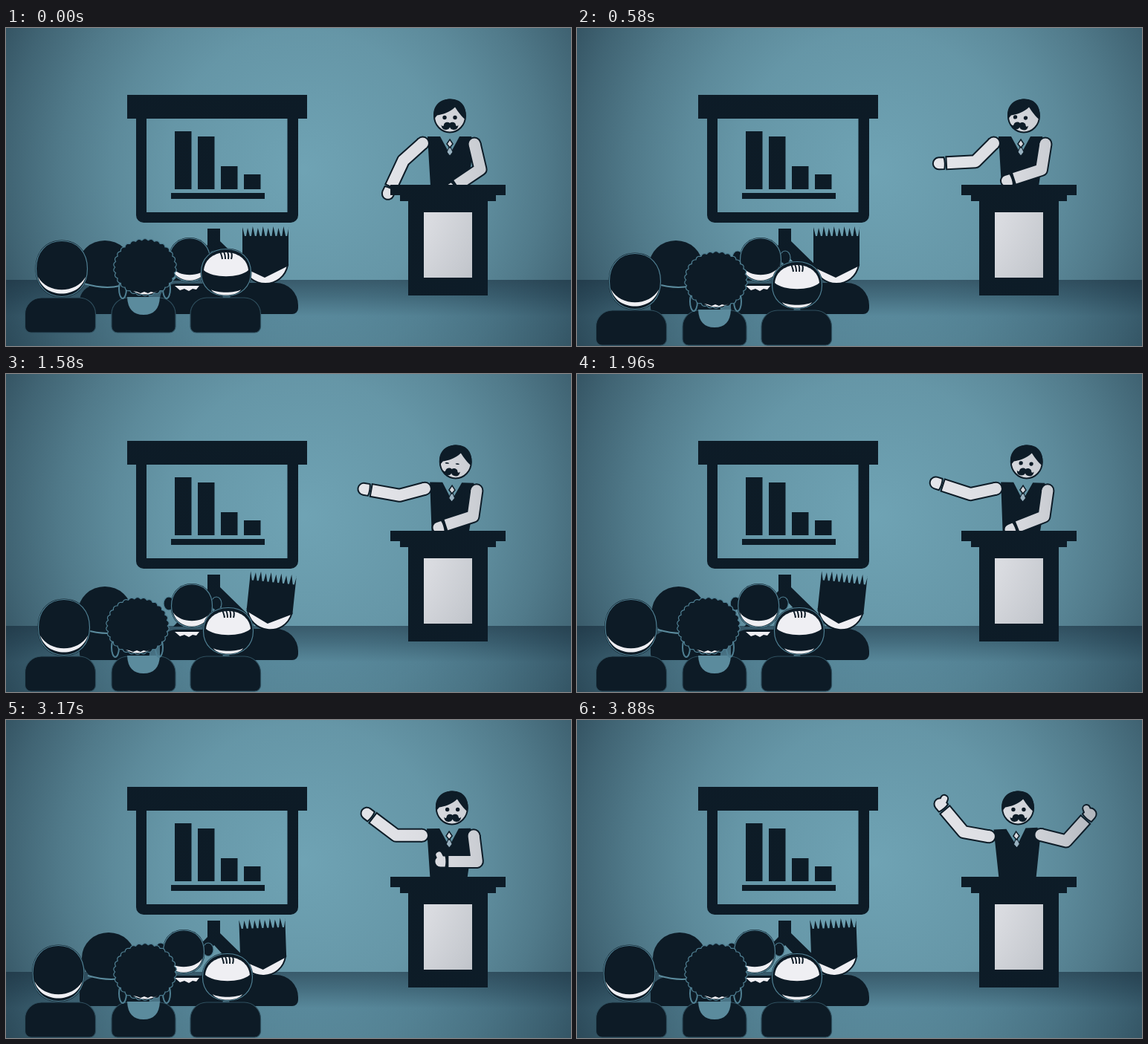
These frames come from a looping animation (760 by 428 pixels, 3.93 s). An HTML page with a canvas:

```html
<!DOCTYPE html>
<html lang="en">
<head>
<meta charset="utf-8">
<title>Presentation</title>
<style>
html, body { margin: 0; width: 100%; height: 100%; overflow: hidden; background: #6fa3b4; }
canvas { display: block; }
</style>
</head>
<body>
<canvas id="stage" width="760" height="428"></canvas>
<script>
const ctx = document.getElementById('stage').getContext('2d');
const LOOP = 3930, DARK = '#0d1b26', WHITE = '#efeff3', RIM = '#4f7f92';

const clamp = x => Math.min(1, Math.max(0, x));
const rad = deg => deg * Math.PI / 180;
const polar = (x, y, deg, r) => [x + r * Math.cos(rad(deg)), y + r * Math.sin(rad(deg))];

// Arm gestures: time, then upper arm and forearm angles, left and right.
const gestures = [
  [0, 138, 115, 77, 146],
  [580, 135, 177, 99, 162],
  [1130, 146, 153, 98, 179],
  [1580, 165, 190, 98, 162],
  [2540, 173, 213, 98, 152],
  [3170, 180, 217, 83, 180],
  [3790, 190, 230, 14, 312]
];

function poseAt(t) {
  const ramp = (a, b) => { const k = clamp((t - a) / (b - a)); return k * k * (3 - 2 * k); };
  const bump = (a, b) => Math.sin(Math.PI * clamp((t - a) / (b - a)));

  const i = Math.max(1, gestures.findIndex(g => g[0] > t));
  const [from, to] = t > 3790 ? [gestures[6], gestures[6]] : [gestures[i - 1], gestures[i]];
  const k = from === to ? 0 : ramp(from[0], to[0]);
  const [, leftUpper, leftFore, rightUpper, rightFore] = from.map((v, n) => v + (to[n] - v) * k);

  const lean = 1.3 * ramp(1130, 1550) - 1.7 * ramp(2720, 3100) - 2.3 * ramp(3250, 3750);
  const intro = ramp(0, 450);
  const turn = ramp(650, 1000) - ramp(2720, 3050);
  const shift = ramp(1700, 2100);
  const settle = ramp(2720, 3050);
  return {
    lean, leftUpper, leftFore, rightFore,
    rightUpper: rightUpper - 46 * (bump(0, 580) + bump(2540, 3170)),
    leftThumb: ramp(3400, 3700),
    rightThumb: ramp(2900, 3100) - 2 * ramp(3250, 3700),
    headX: 597 + 4 * intro + 167 * Math.sin(rad(lean)),
    face: .8 * shift - 4.5 * (intro - shift),
    tilt: 5 * (intro - settle),
    eyes: 1 - .7 * bump(1450, 1710),
    drop: -17 * (1 - ramp(0, 400)),
    capX: 75 + 3 * intro - 7.5 * shift,
    backX: 133 + 5 * shift,
    bunX: 247 + 3 * turn - 8 * shift,
    spikeX: 349 + 3 * turn - 2 * settle,
    spikeTurn: 6 * turn - 2 * settle,
    afroX: 187 - 10 * turn,
    baldX: 296 + 3 * (ramp(1150, 1500) - ramp(2750, 3800))
  };
}

function place(x, y, deg, draw) {
  ctx.save();
  ctx.translate(x, y);
  ctx.rotate(rad(deg));
  draw();
  ctx.restore();
}

function paint(path, fill, line, width = 1.2) {
  if (fill) { ctx.fillStyle = fill; ctx.fill(path, 'evenodd'); }
  if (line) { ctx.strokeStyle = line; ctx.lineWidth = width; ctx.stroke(path); }
}

const shape = (d, fill, line, width) => paint(new Path2D(d), fill, line, width);

function rect(x, y, w, h, fill = DARK, radii = 0, line) {
  const p = new Path2D();
  p.roundRect(x, y, w, h, radii);
  paint(p, fill, line);
}

function oval(x, y, rx, ry, fill, line, width) {
  const p = new Path2D();
  p.ellipse(x, y, rx, ry, 0, 0, 7);
  paint(p, fill, line, width);
}

function gradient(g, ...stops) {
  stops.forEach(([at, color]) => g.addColorStop(at, color));
  return g;
}

const floor = gradient(ctx.createLinearGradient(0, 339, 0, 428),
  [0, '#3c5f70'], [.25, '#4a7587'], [.55, '#6296a9'], [1, '#669bad']);
const vignette = gradient(ctx.createRadialGradient(400, 190, 0, 400, 190, 465),
  ...[0, .4, .55, .7, .86, 1].map(r => [r, `rgba(14,32,46,${.66 * r ** 2.1})`]));

function room() {
  rect(0, 0, 760, 428, '#6fa3b4');
  rect(0, 339, 760, 89, floor);
}

function screen() {
  shape('M271 270H288V287L334 332L314 340L280 303L240 340H225L271 292Z', DARK);
  rect(163, 90, 242, 32);
  shape('M175 120H393V252A10 10 0 0 1 383 262H185A10 10 0 0 1 175 252ZM189 122V248H378.5V122Z', DARK);
  [78, 71, 31, 20].forEach((h, i) => rect(227 + i * 31, 217 - h, 22.5, h));
  rect(222, 222, 126, 8);
}

function hand(thumb) {
  const finger = new Path2D(`M9 ${3 * thumb}L12 ${9 * thumb}`);
  ctx.lineCap = 'round';
  if (thumb) paint(finger, null, DARK, 12);
  shape('M3 -8H10A8 8 0 0 1 10 8H3Q1 0 3 -8Z', WHITE, DARK, 2);
  if (thumb) paint(finger, null, WHITE, 8);
  ctx.lineCap = 'butt';
}

function arm(x, y, upper, fore, thumb) {
  const elbow = polar(x, y, upper, 35);
  const limb = (width, color, reach) => {
    oval(x, y, width / 2, width / 2, color);
    shape(`M${x} ${y}L${elbow}L${polar(...elbow, fore, reach)}`, null, color, width);
  };
  ctx.lineJoin = 'round';
  limb(19, DARK, 40);
  limb(15, WHITE, 38);
  place(...polar(...elbow, fore, 39), fore, () => hand(thumb));
}

function speaker(p) {
  place(596, 285, p.lean, () => {
    ctx.translate(-596, -285);
    shape('M567 146H584L597 170L610 146H626L629 160L621 213H571Z', DARK);
    shape('M597 158L601 167L597 172L593 167Z', '#a9c3d2', DARK, 1);
    shape('M597 150L601 156L597 161L593 156Z', WHITE, DARK, 1.5);
    arm(560.5, 155, p.leftUpper - p.lean, p.leftFore - p.lean, p.leftThumb);
    arm(630, 156, p.rightUpper - p.lean, p.rightFore - p.lean, p.rightThumb);
  });
  place(p.headX, 118.5, 0, () => {
    oval(0, 0, 21, 22, WHITE, DARK, 2);
    shape('M-21 5C-25 -13 -14 -23 1 -23C16 -23 24 -12 21 5C16 1 11 -6 7 -12C0 -5 -10 -2 -17 -1Q-20 2 -21 5Z', DARK);
    place(p.face, 2, p.tilt, () => {
      oval(-7, 0, 2.7, 2.7 * p.eyes, DARK);
      oval(7, 0, 2.7, 2.7 * p.eyes, DARK);
      shape('M0 7.5C-3 5 -8 7 -8 10Q-9 13 -11.5 10Q-11 17 -5 16.5Q-1 16 0 13Q1 16 5 16.5Q11 17 11.5 10Q9 13 8 10C8 7 3 5 0 7.5Z', DARK);
    });
  });
}

function podium() {
  rect(517, 211, 155, 14);
  rect(530, 224, 129, 9);
  rect(541, 224, 107, 136);
  rect(562, 248, 65, 88, WHITE);
}

// A rounded, slightly square head with a thin line just inside its edge.
function skull(rx, ry) {
  const outline = (a, b) => {
    const c = a * .6, d = b * .6;
    return `M0 ${-b}C${c} ${-b} ${a} ${-d} ${a} 0S${c} ${b} 0 ${b}S${-a} ${d} ${-a} 0S${-c} ${-b} 0 ${-b}Z`;
  };
  shape(outline(rx, ry), DARK);
  shape(outline(rx - 1, ry - 1), null, RIM);
}

// A smile-shaped strip from -w to w, starting at height y.
const crescent = (w, y, low, high) =>
  shape(`M${-w} ${y}C${-w * .75} ${low} ${w * .75} ${low} ${w} ${y}C${w * .6} ${high} ${-w * .6} ${high} ${-w} ${y}Z`, WHITE);

const body = (x, y, w, h, line) => rect(x, y, w, h, DARK, [22, 22, 8, 8], line);

function backRow(p) {
  body(99, 346, 94, 39);
  oval(p.backX, 320, 36, 34, DARK);
  shape(`M${p.backX - 28} 344Q${p.backX} 352 ${p.backX + 20} 347`, null, '#5b8b9d', 2);

  body(207, 344, 85, 41);
  shape('M227 347H260L256 352L251 351L246 354L240 351L234 353Z', WHITE);
  place(p.bunX, 312, 0, () => {
    oval(-31, -3, 7, 9, DARK, RIM);
    oval(33, -3, 7, 9, DARK, RIM);
    skull(28.5, 30);
    crescent(25, 9, 34, 24);
  });

  rect(300, 343, 93, 42, DARK, [28, 30, 8, 8]);
  place(p.spikeX, 344, p.spikeTurn, () => {
    shape('M-30 -25C-27 -9 -14 0 0 0C14 0 27 -9 30 -25Z', WHITE, DARK, 2);
    let hair = 'M-31 -22V-76';
    for (let i = 0; i < 9; i++) hair += `L${-28 + i * 6.9} -64H${-26 + i * 6.9}L${-24 + i * 6.9} ${-75 - i % 2 * 2}`;
    shape(hair + 'L31 -76V-24L-1 -8Z', DARK);
  });
}

let curls = 'M';
for (let a = 0; a < 360; a += 1.5) {
  const r = .96 + .05 * Math.abs(Math.sin(rad(a * 15)));
  curls += `${42 * r * Math.cos(rad(a))} ${38 * r * Math.sin(rad(a))}L`;
}
const afro = new Path2D(curls.slice(0, -1) + 'Z');

function frontRow(p) {
  body(25.5, 380, 95, 47, '#2f4f5e');
  place(p.capX, 341, 0, () => {
    skull(35.5, 38.5);
    crescent(32, 11, 41, 34);
  });

  body(142, 380, 86, 47, '#2f4f5e');
  shape('M163 379H207Q206 403 185 403Q164 403 163 379Z', '#5b8b9d');
  place(p.afroX, 339, 0, () => {
    [-30, 29].forEach(x => oval(x, 29, 5, 13, null, RIM, 2));
    paint(afro, DARK, RIM);
    shape('M-16 32Q0 41 17 32L12 34L8 33L4 35L-1 33L-6 35L-11 33Z', WHITE);
  });

  body(248, 380, 94.5, 47, '#2f4f5e');
  place(p.baldX, 346, 0, () => {
    skull(34.5, 32.5);
    shape('M-30 -3C-27 -35 27 -35 30 -3C18 8 -18 8 -30 -3Z', WHITE);
    crescent(20, 23, 33, 28);
    for (let i = 0; i < 4; i++) shape(`M${-9 + i * 5} -29Q${-6 + i * 5} -25 ${-5 + i * 4} -18`, null, DARK, 2);
  });
}

function draw(t) {
  const p = poseAt(t);
  room();
  screen();
  speaker(p);
  podium();
  rect(0, 0, 760, 428, vignette);
  backRow(p);
  place(0, p.drop, 0, () => frontRow(p));
}

const start = performance.now();
function tick() {
  draw((performance.now() - start) % LOOP);
  requestAnimationFrame(tick);
}
tick();
</script>
</body>
</html>
```
